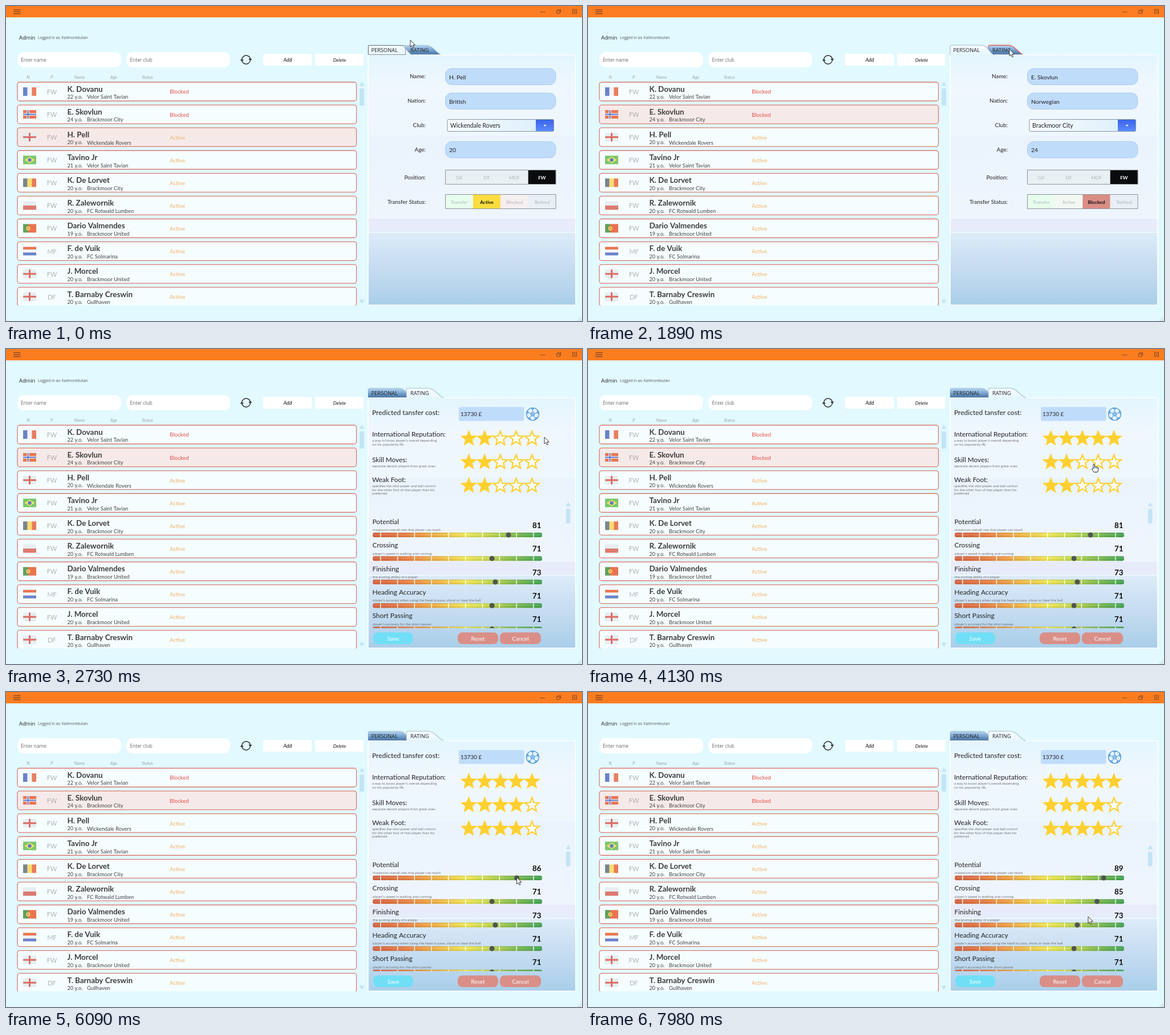
An HTML page with a canvas that plays this animation: 1010x554 px, repeating every 8 s.

```html
<!DOCTYPE html>
<html lang="en">
<head>
<meta charset="utf-8">
<title>Player editor</title>
<style>
html, body { margin: 0; width: 100%; height: 100%; overflow: hidden; background: #e1f9ff; }
canvas { display: block; width: 1010px; height: 554px; }
</style>
</head>
<body>
<canvas id="stage"></canvas>
<script>
const W = 1010, H = 554, LOOP = 8000, STEP = 70;
const canvas = document.getElementById('stage');
const c = canvas.getContext('2d');
const dpr = window.devicePixelRatio || 1;
canvas.width = W * dpr;
canvas.height = H * dpr;

const UI = '"Open Sans", "Noto Sans", sans-serif';
const ROUND = 'Lato, "Open Sans", sans-serif';
const RED = '#db7b73', FIELD = '#c0dcfb', SCROLL = '#c3e5f3', YELLOW = '#fdd030';

// Prefer a condensed face where there is one, at a size of equal line length.
const faces = {};
function face(weight) {
  if (faces[weight]) return faces[weight];
  const sample = 'Predicted Heading Accuracy 20';
  const measure = (family, stretch) => {
    c.font = `${weight} 40px ${family}`;
    c.fontStretch = stretch;
    return c.measureText(sample).width;
  };
  const grow = measure(ROUND, 'normal') / measure(UI, 'condensed');
  c.fontStretch = 'normal';
  const slim = grow > 1.08 && grow < 1.35;
  return faces[weight] = slim
    ? { family: UI, grow, stretch: 'condensed' }
    : { family: ROUND, grow: 1, stretch: 'normal' };
}

function put(str, x, cy, size, color, align) {
  c.fillStyle = color;
  c.textAlign = align;
  c.fillText(str, x, cy + size * 0.36);
}
function ui(str, x, cy, size, color = '#333', align = 'left') {
  c.font = `400 ${size}px ${UI}`;
  c.fontStretch = 'normal';
  put(str, x, cy, size, color, align);
}
function text(str, x, cy, size, color = '#222', align = 'left', weight = 400, style = 'normal') {
  const f = face(weight), px = size * f.grow;
  c.font = `${style} ${weight} ${px}px ${f.family}`;
  c.fontStretch = f.stretch;
  put(str, x, cy, px, color, align);
}

function box(x, y, w, h, r, fill, stroke, line = 1) {
  c.beginPath();
  c.roundRect(x, y, w, h, r);
  if (fill) { c.fillStyle = fill; c.fill(); }
  if (stroke) { c.strokeStyle = stroke; c.lineWidth = line; c.stroke(); }
}
function rect(x, y, w, h, fill) {
  c.fillStyle = fill;
  c.fillRect(x, y, w, h);
}
function poly(pts, fill, stroke, line = 1) {
  c.beginPath();
  pts.forEach(([x, y]) => c.lineTo(x, y));
  c.closePath();
  if (fill) { c.fillStyle = fill; c.fill(); }
  if (stroke) { c.strokeStyle = stroke; c.lineWidth = line; c.stroke(); }
}
function lines(segs, color, width = 1) {
  c.beginPath();
  segs.forEach(([a, b, d, e]) => { c.moveTo(a, b); c.lineTo(d, e); });
  c.strokeStyle = color;
  c.lineWidth = width;
  c.stroke();
}
function disc(x, y, r, fill) {
  c.beginPath();
  c.arc(x, y, r, 0, 7);
  c.fillStyle = fill;
  c.fill();
}
function grad(x0, y0, x1, y1, stops) {
  const g = c.createLinearGradient(x0, y0, x1, y1);
  stops.forEach(([at, color]) => g.addColorStop(at, color));
  return g;
}
function clipped(x, y, w, h, draw) {
  c.save();
  c.beginPath();
  c.rect(x, y, w, h);
  c.clip();
  draw();
  c.restore();
}

// Flags, 23 by 15
const bars = (...cols) => (x, y) => cols.forEach((k, i) => rect(x + i * 23 / cols.length, y, 23 / cols.length, 15, k));
const bands = (...cols) => (x, y) => cols.forEach((k, i) => rect(x, y + i * 15 / cols.length, 23, 15 / cols.length, k));
function cross(x, y, cx, width, color) {
  rect(x, y + 7.5 - width / 2, 23, width, color);
  rect(x + cx - width / 2, y, width, 15, color);
}
const flags = {
  fr: bars('#6b82cb', '#f2f4f7', '#e87f5f'),
  be: bars('#7c858b', '#f8dd6e', '#e97c56'),
  pl: bands('#e8eef0', '#dc7a70'),
  nl: bands('#e9774f', '#f2f5f7', '#6c82cc'),
  en(x, y) { rect(x, y, 23, 15, '#e6eef0'); cross(x, y, 11.5, 3, '#dc6c64'); },
  no(x, y) {
    rect(x, y, 23, 15, '#ea754f');
    cross(x, y, 8.5, 4.4, '#f2f4f7');
    cross(x, y, 8.5, 2, '#5f78c8');
  },
  br(x, y) {
    rect(x, y, 23, 15, '#7cc76c');
    poly([[x + 2.5, y + 7.5], [x + 11.5, y + 2], [x + 20.5, y + 7.5], [x + 11.5, y + 13]], '#f8e468');
    disc(x + 11.5, y + 7.5, 3.3, '#5f7cc4');
  },
  pt(x, y) {
    rect(x, y, 9, 15, '#64a05c');
    rect(x + 9, y, 14, 15, '#e9744f');
    disc(x + 9, y + 7.5, 3.6, '#f3d566');
    disc(x + 9, y + 7.5, 1.8, '#e8896c');
  }
};

const players = [
  ['fr', 'FW', 'K. Dovanu', 22, 'Velor Saint Tavian'],
  ['no', 'FW', 'E. Skovlun', 24, 'Brackmoor City'],
  ['en', 'FW', 'H. Pell', 20, 'Wickendale Rovers'],
  ['br', 'FW', 'Tavino Jr', 21, 'Velor Saint Tavian'],
  ['be', 'FW', 'K. De Lorvet', 20, 'Brackmoor City'],
  ['pl', 'FW', 'R. Zalewornik', 20, 'FC Rotwald Lumben'],
  ['pt', 'FW', 'Dario Valmendes', 19, 'Brackmoor United'],
  ['nl', 'MF', 'F. de Vuik', 20, 'FC Solmarina'],
  ['en', 'FW', 'J. Morcel', 20, 'Brackmoor United'],
  ['en', 'DF', 'T. Barnaby Creswin', 20, 'Gullhaven']
];

const skills = [
  ['Potential', 'maximum overall rate that player can reach'],
  ['Crossing', "player's speed in walking and running"],
  ['Finishing', 'the scoring ability of a player'],
  ['Heading Accuracy', "player's accuracy when using the head to pass, shoot or clear the ball"],
  ['Short Passing', "player's accuracy for the short passes"]
];

// Pointer route: time, x, y
const route = [
  [140, 709, 60], [910, 422, 176], [1120, 414, 188], [1260, 414, 190],
  [1820, 734, 78], [1890, 739, 76], [2100, 741, 77], [2730, 944, 155],
  [3080, 924, 158], [3430, 924, 160], [4130, 887, 202], [4480, 890, 202],
  [4830, 892, 244], [5180, 892, 244], [5600, 881, 326], [5740, 881, 326],
  [6090, 895.6, 326], [6300, 904.3, 326], [6510, 904.3, 327], [6860, 852.3, 368],
  [7000, 852.3, 368], [7490, 892.7, 368], [7630, 892.7, 369], [7980, 877, 395]
];
function pointer(t) {
  const i = route.findIndex(k => k[0] >= t);
  if (i === 0) return route[0].slice(1);
  if (i < 0) return route[route.length - 1].slice(1);
  const [t0, x0, y0] = route[i - 1], [t1, x1, y1] = route[i];
  const u = (t - t0) / (t1 - t0), e = u * u * (3 - 2 * u);
  return [x0 + (x1 - x0) * e, y0 + (y1 - y0) * e];
}

const knobX = v => 647 + 2.89 * v;
function dragged(t, from, to, before, after, x) {
  return t < from ? before : t > to ? after : Math.round((x - 647) / 2.89);
}

function triangle(x, y, dir, color) {
  poly([[x - 4.5, y + 3.5 * dir], [x + 4.5, y + 3.5 * dir], [x, y - 4 * dir]], color);
}

function titleBar() {
  rect(0, 0, W, 20, '#fb7d20');
  const ink = '#8a4a22';
  lines([[13, 6.5, 25.5, 6.5], [13, 10, 25.5, 10], [13, 13.5, 25.5, 13.5]], ink, 1.3);
  lines([[937, 10.5, 945.5, 10.5], [995, 7.5, 999, 11.5], [999, 7.5, 995, 11.5]], ink);
  c.strokeRect(965.5, 8.5, 5.5, 4.5);
  c.strokeRect(993.5, 6, 7, 7);
  lines([[967.5, 8, 967.5, 6], [967, 6.5, 973, 6.5], [972.5, 6.5, 972.5, 11], [973, 11, 971, 11]], ink);
}

function refreshIcon(x, y) {
  for (const turn of [0, Math.PI]) {
    c.save();
    c.translate(x, y);
    c.rotate(turn);
    c.beginPath();
    c.arc(0, 0, 7.5, Math.PI * 1.08, Math.PI * 1.95);
    c.strokeStyle = '#333';
    c.lineWidth = 1.5;
    c.stroke();
    poly([[4.2, -1.8], [10.4, -1.8], [7.4, 2.2]], '#333');
    c.restore();
  }
}

function toolbar() {
  ui('Admin', 23, 55.5, 9.3, '#222');
  ui('Logged in as: Kalimorebutan', 56, 56, 6.6, '#555');
  box(20, 81, 182, 27, 11, '#fff');
  box(211, 81, 182, 27, 11, '#fff');
  ui('Enter name', 26, 95.5, 8.3, '#666');
  ui('Enter club', 217.5, 95.5, 8.3, '#666');
  refreshIcon(421, 94.5);
  box(451, 84, 85, 21, 2, '#fff');
  box(542, 84, 85, 21, 2, '#fff');
  text('Add', 494, 95, 8.8, '#111', 'center', 400, 'italic');
  text('Delete', 585, 95, 8.4, '#111', 'center', 400, 'italic');
  [['N', 39], ['P', 80], ['Name', 129], ['Age', 189], ['Status', 248]]
    .forEach(([s, x]) => text(s, x, 125.5, 7.5, '#98a5ab', 'center', 400, 'italic'));
}

function playerList(selected) {
  clipped(0, 130, 632, 396.5, () => players.forEach(([flag, pos, name, age, club], i) => {
    const y = 134 + 40.08 * i, blocked = i < 2;
    box(20, y, 594.5, 33, 4, i === selected ? '#f6eae9' : '#f5fdff', RED, 1.3);
    flags[flag](30, y + 9);
    text(pos, 80.5, y + 17, 11, '#777', 'center', 300);
    text(name, 107.5, y + 12, 13.4, '#3c3c3c', 'left', 700);
    clipped(20, y, 590, 31.5, () => {
      text(age + ' y.o.', 107.5, y + 26, 9.1, '#444');
      text(club, 142, y + 26, 9.3, '#444');
    });
    text(blocked ? 'Blocked' : 'Active', 287, y + 17, 9.7, blocked ? '#e2504c' : '#f0b267');
  }));
  triangle(624, 137, 1, SCROLL);
  box(620, 145, 8, 30, 1, SCROLL);
  triangle(624, 520, -1, SCROLL);
}

function tabShape(x, flat, end, fill, stroke, line = 1) {
  c.beginPath();
  c.moveTo(x, 86);
  c.lineTo(x, 72);
  c.quadraticCurveTo(x, 69, x + 3, 69);
  c.lineTo(flat, 69);
  c.bezierCurveTo(flat + 12, 69, end - 9, 84, end, 86);
  c.fillStyle = fill;
  c.fill();
  if (stroke) { c.strokeStyle = stroke; c.lineWidth = line; c.stroke(); }
}

function panel() {
  rect(635, 86, 364, 440, grad(0, 86, 0, 374, [[0, '#e3f5fe'], [0.2, '#f0f7fe'], [0.49, '#eef6fe'], [0.5, '#eaf3fd'], [1, '#eff5fd']]));
  rect(635, 374, 364, 25, '#e8ebf9');
  rect(635, 394, 364, 132, grad(0, 394, 0, 526, [[0, '#e4effa'], [0.04, '#dcebf8'], [0.5, '#c6dcf1'], [1, '#a9cee9']]));
  lines([[635, 398, 999, 398]], 'rgba(255,255,255,.75)', 1.5);
  box(635, 86, 364, 440, 0, null, '#fff', 1.5);
}

function tabs(rating, hover, focus) {
  const blue = grad(0, 69, 0, 86, [[0, '#b9d7ef'], [0.35, '#8bb4dc'], [1, '#416f9f']]);
  const light = grad(0, 69, 0, 88, [[0, '#f6fbff'], [1, '#e6f6fe']]);
  const edge = 'rgba(130,155,175,.45)';
  if (rating) {
    tabShape(635, 690, 712, blue, edge);
    panel();
    tabShape(702, 740, 768, light, edge, 1.5);
    rect(703, 85, 62, 2.5, '#e4f5fe');
  } else {
    tabShape(702, 737, 764, blue, hover ? '#e26660' : edge, hover ? 1.4 : 1);
    panel();
    tabShape(635, 690, 713, light, edge, 1.5);
    rect(636, 85, 74, 2.5, '#e4f5fe');
    if (focus) {
      c.setLineDash([1, 1]);
      c.strokeStyle = '#333';
      c.lineWidth = 1;
      c.strokeRect(635.5, 69.5, 65, 16);
      c.setLineDash([]);
    }
  }
  ui('PERSONAL', 640.5, 78, 9.3, '#222');
  ui('RATING', 709, 78, 9.3, '#222');
}

function segments(y, labels, active, fills, on, onText) {
  labels.forEach((s, i) => {
    const x = 770.5 + 48.4 * i, lit = i === active;
    rect(x, y, 48.4, 25, lit ? on : fills[i]);
    text(s, x + 24.2, y + 13, 8.4, lit ? onText : '#b0b6bb', 'center', lit ? 700 : 400);
  });
  box(770.5, y, 193.6, 25, 0, null, '#8d9499');
}

function personal(player, nation, blocked) {
  const [, , name, age, club] = player;
  [['Name:', 123], ['Nation:', 166.5], ['Club:', 209.5], ['Age:', 252.5], ['Position:', 301], ['Transfer Status:', 344]]
    .forEach(([s, y]) => text(s, 736, y, 9.9, '#222', 'right'));
  [[name, 110], [nation, 153], [age, 238.5]].forEach(([s, y]) => {
    box(770.5, y, 193.5, 28.5, 11, FIELD, '#a9ccec');
    text(s, 777, y + 15, 10.4);
  });
  box(774, 199.5, 186.5, 21, 2, grad(774, 0, 929, 0, [[0, '#f8fcff'], [1, '#dff0fb']]), '#8494a5');
  rect(929, 200, 31, 20, grad(0, 200, 0, 220, [[0, '#3a64ea'], [1, '#5b8bff']]));
  poly([[942.5, 209], [947.5, 209], [945, 212]], '#fff');
  text(club, 779, 210.5, 10.5);
  segments(288.5, ['GK', 'DF', 'MDF', 'FW'], 3, Array(4).fill('#e9f0f3'), '#090b0d', '#fff');
  segments(331.5, ['Transfer', 'Active', 'Blocked', 'Retired'], blocked ? 2 : 1,
    ['#e8fdec', '#f4f8f3', '#f5eff0', '#e8eff5'], blocked ? '#d98d85' : '#fbdd40', '#111');
}

function ring(x, y, r, n, turn) {
  return Array.from({ length: n }, (_, i) => {
    const a = turn + i * 2 * Math.PI / n;
    return [x + r * Math.cos(a), y + r * Math.sin(a)];
  });
}

function ball(x, y) {
  const ink = '#4f97d8', up = -Math.PI / 2;
  disc(x, y, 11, '#e2f2fd');
  const inner = ring(x, y, 4, 5, up), mid = ring(x, y, 7.8, 5, up), rim = ring(x, y, 11, 10, up + Math.PI / 10);
  poly(inner, '#8fc2ee', ink);
  lines(inner.map((p, i) => [...p, ...mid[i]]), ink);
  mid.forEach((p, i) => poly([p, rim[2 * i], rim[(2 * i + 9) % 10]], '#8fc2ee', ink));
  c.beginPath();
  c.arc(x, y, 11, 0, 7);
  c.strokeStyle = ink;
  c.lineWidth = 1.2;
  c.stroke();
}

function stars(cy, count) {
  for (let i = 0; i < 5; i++) {
    const full = i < count, R = full ? 15.5 : 13;
    const x = 811.5 + 27.7 * i, up = -Math.PI / 2;
    const outer = ring(x, cy + 1, R, 5, up), inner = ring(x, cy + 1, R * 0.43, 5, up + Math.PI / 5);
    poly(outer.flatMap((p, k) => [p, inner[k]]), full ? YELLOW : '#fbfcfa', full ? null : YELLOW, 2.2);
  }
}

function slider([name, note], i, value) {
  const y = 327 + 41.4 * i;
  text(name, 642.5, y - 23.5, 11.9);
  ui(note, 643, y - 9, 5.9, '#666');
  text(value, 938.5, y - 17, 13.4, '#0c0c0c', 'right', 700);
  box(643, y - 4, 297, 8, 3, grad(643, 0, 940, 0, [
    [0, '#d95a38'], [0.17, '#ea7338'], [0.36, '#f4ac3b'], [0.55, '#f5ec4a'], [0.68, '#c6dc45'], [0.85, '#72b944'], [1, '#32a04c']]));
  box(643, y - 4, 297, 8, 3, grad(0, y - 4, 0, y + 4, [[0, 'rgba(70,50,0,.2)'], [0.35, 'rgba(255,255,255,.14)'], [1, 'rgba(70,50,0,.16)']]));
  for (let k = 0; k < 10; k++) rect(656 + 29.8 * k, y - 4, 1.5, 8, 'rgba(255,255,255,.9)');
  disc(knobX(value), y, 4.5, '#505552');
}

function rating(counts, values) {
  text('Predicted tansfer cost:', 642, 112, 12);
  box(794, 102, 114.5, 24.5, 3, FIELD);
  text('13730 £', 797, 114.5, 10);
  ball(923.5, 114.5);
  text('International Reputation:', 642, 150, 11.8);
  text('Skill Moves:', 642, 195, 11.8);
  text('Weak Foot:', 642, 230, 11.8);
  [["a way to boost player's overall depending", 161], ['on his popularity IRL', 168],
    ['separate decent players from great ones', 206],
    ['specifies the shot power and ball control', 240.5],
    ['for the other foot of that player than his', 247.5], ['preferred', 254]]
    .forEach(([s, y]) => ui(s, 642, y, 5.9, '#666'));
  counts.forEach((n, i) => stars(156.5 + 41.5 * i, n));
  triangle(986, 273, 1, SCROLL);
  box(982, 281, 7.5, 25.5, 1, SCROLL);
  triangle(986, 484, -1, 'rgba(185,215,238,.8)');
  clipped(636, 270, 340, 221, () => skills.forEach((s, i) => slider(s, i, values[i])));
  [['Save', 644, 70, '#70dff6'], ['Reset', 792, 71, '#d98f88'], ['Cancel', 866, 72, '#d98f88']].forEach(([s, x, w, k]) => {
    box(x, 498.5, w, 20.5, 8, k);
    text(s, x + w / 2, 509, 9.9, '#fff', 'center');
  });
}

function arrow() {
  poly([[0, 0], [0, 11.8], [2.7, 9.4], [4.6, 13.6], [6.5, 12.7], [4.7, 8.6], [8.2, 8.4]], '#fff', '#222', 0.9);
}
function hand() {
  c.beginPath();
  c.moveTo(-1, 9);
  c.lineTo(-1, 1);
  c.quadraticCurveTo(0.2, -1, 1.4, 1);
  c.lineTo(1.4, 5);
  c.quadraticCurveTo(3.6, 4, 4, 5.6);
  c.quadraticCurveTo(5.8, 5, 6.2, 6.5);
  c.quadraticCurveTo(8, 6, 8, 8);
  c.lineTo(7.6, 11.5);
  c.lineTo(6.4, 14.5);
  c.lineTo(0, 14.5);
  c.lineTo(-3.6, 9);
  c.quadraticCurveTo(-3.2, 7.4, -1, 9);
  c.fillStyle = '#fff';
  c.fill();
  c.strokeStyle = '#222';
  c.lineWidth = 1;
  c.stroke();
  lines([[1.4, 5, 1.4, 8], [4, 5.6, 4, 8.2], [6.2, 6.5, 6.2, 8.6]], '#222', 0.8);
}

function draw(t) {
  const [x, y] = pointer(t);
  const chosen = t >= 1260 ? 1 : 2, onRating = t >= 2030;
  const overTab = x > 703 && x < 760 && y > 69 && y < 86;
  const overStars = onRating && x > 798 && x < 936 && y > 142 && y < 254;

  c.setTransform(dpr, 0, 0, dpr, 0, 0);
  rect(0, 0, W, H, '#e1f9ff');
  titleBar();
  toolbar();
  playerList(chosen);
  tabs(onRating, overTab, chosen === 2);
  if (onRating) {
    rating(
      [t >= 3360 ? 5 : 2, t >= 4340 ? 4 : 2, t >= 5040 ? 4 : 2],
      [dragged(t, 5740, 6400, 81, 89, x), dragged(t, 7000, 7560, 71, 85, x), 73, 71, 71]);
  } else {
    personal(players[chosen], chosen === 1 ? 'Norwegian' : 'British', chosen === 1);
  }
  for (let i = 0; i < 3; i++) {
    for (let k = 0; k <= i; k++) rect(1007 - 2.5 * k, 547 + 2.5 * i, 1.3, 1.3, '#b4c3c8');
  }
  c.save();
  c.translate(x, y);
  overStars ? hand() : arrow();
  c.restore();
}

const start = performance.now();
function tick() {
  const t = (performance.now() - start) % LOOP;
  draw(Math.floor(t / STEP + 0.01) * STEP);
  requestAnimationFrame(tick);
}
tick();
</script>
</body>
</html>
```
